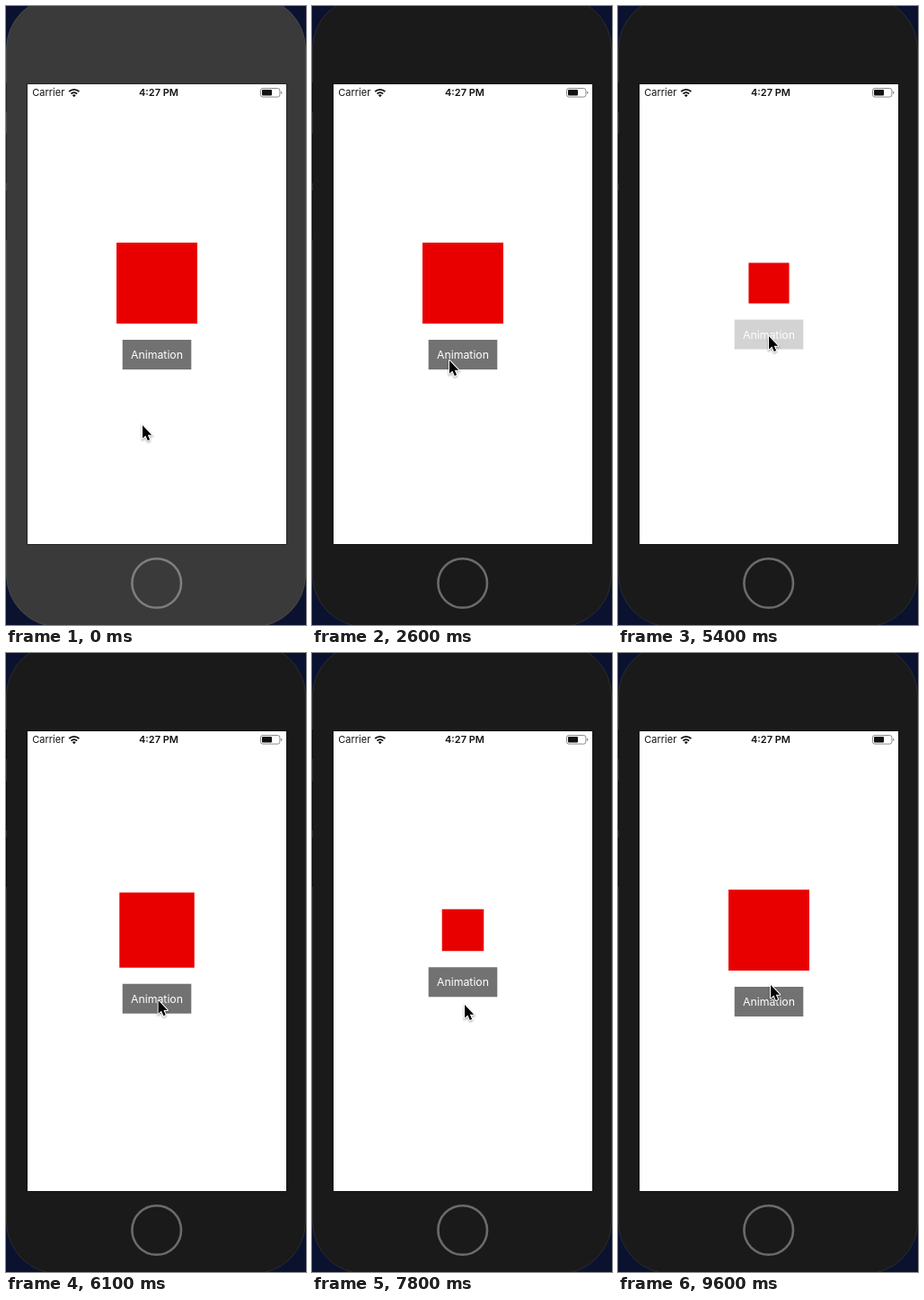
These frames come from a looping animation (334x688 px, 10000 ms). An HTML page:

```html
<!DOCTYPE html>
<html lang="en">
<head>
<meta charset="utf-8">
<title>Button animation</title>
<style>
html, body { margin: 0; width: 100%; height: 100%; overflow: hidden; background: #0a1230; }
svg { display: block; width: 334px; height: 688px; font-family: Inter, Roboto, sans-serif; }
#body { fill: #3a3a3a; stroke: #484848; }
#home { fill: none; stroke: #7e7e7e; stroke-width: 2.6; }
#keys { fill: #242424; }
.active #body { fill: #1a1a1a; stroke: #2c2c2c; }
.active #home { stroke: #6b6b6b; }
.active #keys { fill: #0d0d0d; }
</style>
</head>
<body>
<svg id="stage" viewBox="0 0 334 688">
  <defs>
    <filter id="soft" x="-50%" y="-50%" width="200%" height="200%">
      <feGaussianBlur stdDeviation="1"/>
    </filter>
    <path id="arrow" d="M0 0V14.6L3.4 11.5L5.8 17L8.1 16L5.8 10.7H10.2Z"/>
  </defs>
  <rect width="334" height="688" fill="#0a1230"/>
  <rect id="body" x=".5" y="-10" width="333" height="700" rx="58"/>
  <path id="keys" d="M0 85h1v33h-1zM0 142h1v55h-1zM0 205h1v55h-1z"/>
  <circle id="home" cx="167.7" cy="641.5" r="27.3"/>
  <rect x="23.5" y="86.5" width="289" height="512" fill="#101010"/>
  <rect x="24" y="87" width="288" height="511" fill="#fff"/>

  <g id="status" fill="#111">
    <text x="29.3" y="100.3" font-size="11">Carrier</text>
    <text x="170" y="100.3" font-size="11" font-weight="600" text-anchor="middle">4:27 PM</text>
    <g fill="none" stroke="#111" stroke-width="1.9">
      <path d="M70.2 95.2a7.9 7.9 0 0 1 11.2 0"/>
      <path d="M72.5 97.6a4.7 4.7 0 0 1 6.6 0"/>
    </g>
    <path d="M75.8 101.3l-1.9-2a2.7 2.7 0 0 1 3.8 0z"/>
    <rect x="283.5" y="91.5" width="21.4" height="9.6" rx="2.4" fill="none" stroke="#8a8a8a"/>
    <rect x="285" y="93" width="11" height="6.6" rx="1"/>
    <path d="M306 94.8q1.4 .4 1.4 1.5t-1.4 1.5z" fill="#8a8a8a"/>
  </g>

  <rect id="square" fill="#e80000"/>
  <g id="button">
    <rect x="129.7" width="76.6" height="33" fill="#727272"/>
    <text x="168" y="21" font-size="12.3" text-anchor="middle" fill="#fff">Animation</text>
  </g>
  <g id="cursor">
    <use href="#arrow" y="1.2" fill="#000" stroke="#000" stroke-width="2" opacity=".35" filter="url(#soft)"/>
    <use href="#arrow" fill="#000" stroke="#fff" stroke-width="2" stroke-linejoin="round" paint-order="stroke"/>
  </g>
</svg>
<script>
const LOOP = 10000, STEP = 100, FOCUS = 2600;
const BIG = 90, SMALL = 45, CX = 168, CY = 308;

// Tap release times; each tap toggles the size over one second
const taps = [2680, 5365, 6930, 8520];

// time, x, y of the pointer tip
const path = [
  [0, 152, 466], [1500, 152, 466], [2300, 153, 394],
  [3700, 153, 394], [4000, 174, 416], [4100, 174, 416], [4400, 168, 367],
  [5600, 168, 367], [6300, 170, 391], [8000, 170, 391],
  [8400, 170, 369], [LOOP, 170, 369]
];

const el = id => document.getElementById(id);
const clamp = v => Math.min(1, Math.max(0, v));
const mix = (a, b, k) => a + (b - a) * k;
const smooth = k => k * k * (3 - 2 * k);

// cubic-bezier(.42, 0, .58, 1), solved by bisection
function easeInOut(x) {
  let lo = 0, hi = 1;
  for (let i = 0; i < 24; i++) {
    const s = (lo + hi) / 2, r = 1 - s;
    if (3 * r * r * s * .42 + 3 * r * s * s * .58 + s ** 3 < x) lo = s;
    else hi = s;
  }
  return smooth(lo);
}

function pointer(t) {
  const i = path.findIndex(p => p[0] > t);
  const a = path[i - 1], b = path[i];
  const k = smooth((t - a[0]) / (b[0] - a[0]));
  return [mix(a[1], b[1], k), mix(a[2], b[2], k)];
}

function draw(t) {
  let size = BIG, alpha = 1;
  taps.forEach((start, i) => {
    if (t < start) return;
    const [from, to] = i % 2 ? [SMALL, BIG] : [BIG, SMALL];
    size = mix(from, to, easeInOut(clamp((t - start) / 1000)));
    alpha = mix(.2, 1, clamp((t - start) / 260));
  });

  const sq = el('square');
  sq.setAttribute('x', CX - size / 2);
  sq.setAttribute('y', CY - size / 2);
  sq.setAttribute('width', size);
  sq.setAttribute('height', size);

  el('button').setAttribute('transform', `translate(0 ${CY + size / 2 + 18})`);
  el('button').setAttribute('opacity', alpha);
  el('cursor').setAttribute('transform', `translate(${pointer(t)})`);
  el('stage').classList.toggle('active', t >= FOCUS);
}

const begin = performance.now();
function tick() {
  const t = (performance.now() - begin) % LOOP;
  draw(Math.floor(t / STEP) * STEP);
  requestAnimationFrame(tick);
}
tick();
</script>
</body>
</html>
```
